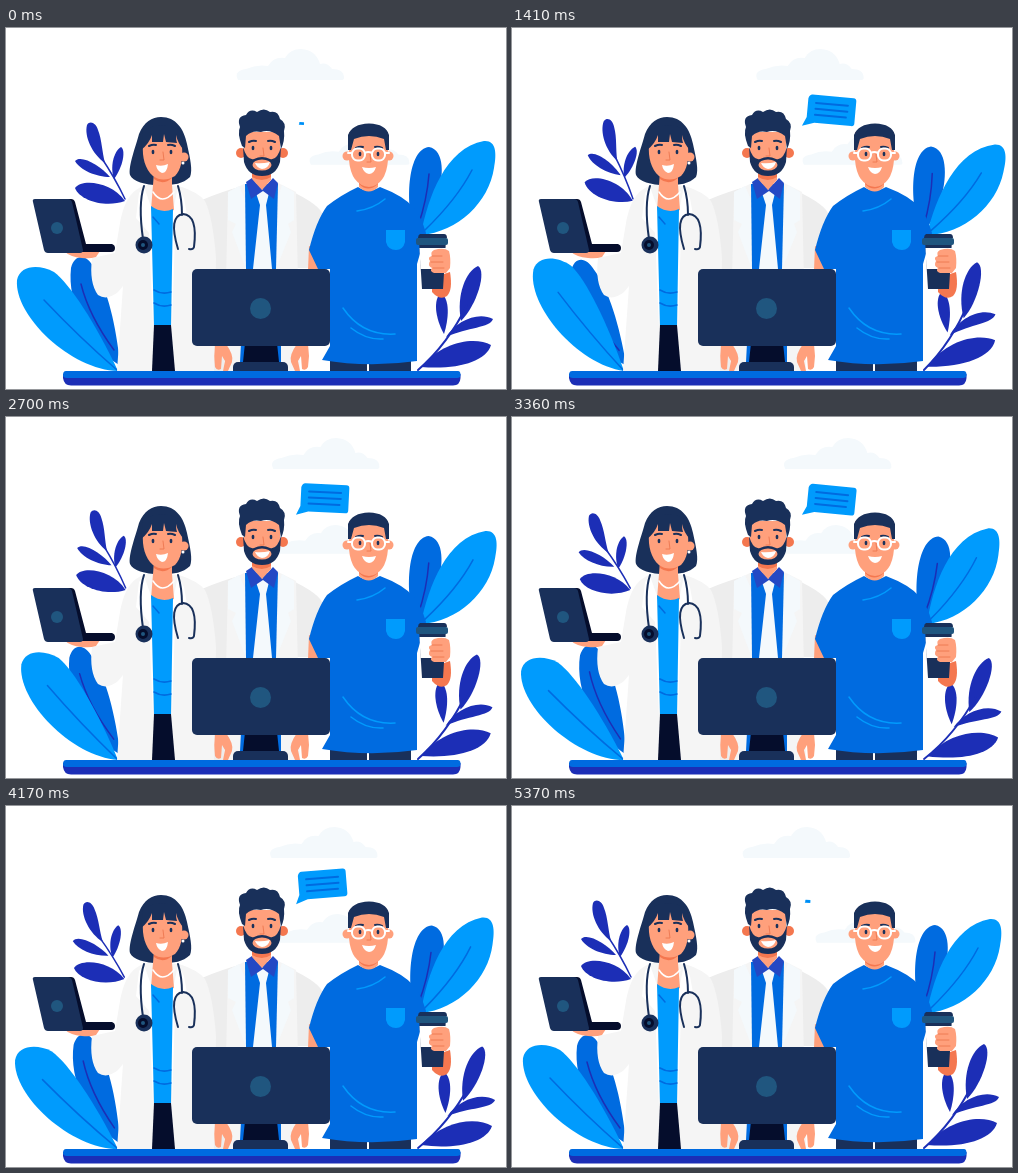
Write an HTML page that moves like this. It is 500 px wide and 361 px high and loops after 5400 ms.

```html
<!DOCTYPE html>
<html lang="en">
<head>
<meta charset="utf-8">
<title>Medical team</title>
<style>
html, body { margin: 0; width: 100%; height: 100%; overflow: hidden; background: #fff; }
svg { display: block; width: 100vw; height: 100vh; }
.sky { fill: #009bfd } .blue { fill: #006be0 } .royal { fill: #1c2eb6 } .collar { fill: #2448c4 }
.navy { fill: #19305a } .ink { fill: #050d2c } .teal { fill: #20567f }
.skin { fill: #ffa07c } .blush { fill: #f4774f } .white { fill: #fff }
.coat { fill: #f5f5f5 } .shade { fill: #ededed } .cloud { fill: #f4f9fc }
.line { fill: none; stroke-width: 1.5; stroke-linecap: round; stroke-linejoin: round }
.thick { stroke-width: 2 } .thin { stroke-width: .9 }
.s-sky { stroke: #009bfd } .s-blue { stroke: #006be0 } .s-royal { stroke: #1c2eb6 }
.s-navy { stroke: #19305a } .s-white { stroke: #fff } .s-blush { stroke: #ed7650 }
</style>
</head>
<body>
<svg viewBox="0 0 500 361" preserveAspectRatio="none">
  <defs>
    <path id="puff" d="M2 31Q-3 22 10 20Q21 15 32 17Q38 7 49 9Q54 0 65 0Q80 1 84 15Q91 13 96 20Q108 20 108 29Q108 31 105 31Z"/>
    <g id="face">
      <ellipse cx="-9" cy="0" rx="1.4" ry="2.3" class="navy"/>
      <ellipse cx="9" cy="0" rx="1.4" ry="2.3" class="navy"/>
      <path class="line thick s-navy" d="M-13-6Q-9-8-6-7M6-7Q9-8 13-6"/>
      <path class="line thin s-blush" d="M1 0L2 8H-2"/>
    </g>
  </defs>

  <g class="cloud">
    <use id="cloudA" href="#puff"/>
    <use id="cloudB" href="#puff"/>
  </g>

  <g id="bubble">
    <path class="sky" d="M5-31H46Q49-31 49-28V-6Q49-3 46-3H9L-3 1L1-8V-27Q2-31 5-31Z"/>
    <path class="line thick s-blue" d="M9-23H41M9-17H41M9-11H40"/>
  </g>

  <!-- Plants -->
  <g id="leftBack">
    <path class="blue" d="M113 337C82 317 61 275 65 240C69 225 81 226 88 240C102 262 110 298 114 335Z"/>
    <path class="line s-royal" d="M75 256Q83 288 108 322"/>
  </g>
  <g id="leftFront">
    <path class="sky" d="M112 343C65 342 8 288 11 252C14 237 33 236 48 244C64 256 90 296 112 343Z"/>
    <path class="line s-blue" d="M38 272Q74 310 111 342"/>
  </g>
  <g id="sprigLeft" class="royal">
    <path d="M99 135C86 126 78 108 81 97C84 92 90 95 92 102C96 112 96 124 99 135Z"/>
    <path d="M108 151C104 140 107 124 115 119C120 122 117 139 108 151Z"/>
    <path d="M104 149C90 149 74 142 69 133C75 126 95 138 104 149Z"/>
    <path d="M119 173C100 180 74 173 69 160C76 150 106 154 119 173Z"/>
    <path class="line s-royal" d="M119 171Q109 150 95 129"/>
  </g>
  <g id="rightBack">
    <path class="blue" d="M408 203C399 172 402 121 423 119C439 122 438 149 431 170C427 186 418 196 412 205Z"/>
    <path class="line s-royal" d="M423 146Q421 172 412 198"/>
  </g>
  <g id="rightFront">
    <path class="sky" d="M415 206C422 170 439 120 478 113C490 112 491 125 488 140C483 174 452 204 415 207Z"/>
    <path class="line s-blue" d="M466 142Q451 171 419 202"/>
  </g>
  <g id="sprigRight" class="royal">
    <path d="M455 293C450 267 460 243 472 238C481 243 471 277 455 293Z"/>
    <path d="M440 309C450 293 472 283 487 291C484 300 462 299 440 309Z"/>
    <path d="M415 339C438 312 470 309 485 317C480 334 450 342 415 339Z"/>
    <path d="M438 306C429 290 427 271 435 265C444 271 443 290 438 306Z"/>
    <path class="line thick s-royal" d="M412 342Q442 316 461 277"/>
  </g>

  <!-- Man in the middle -->
  <path class="shade" d="M240 157Q214 164 196 172L190 343H222L240 240H306L316 185Q311 174 272 157Z"/>
  <path class="coat" d="M238 156L222 164L218 343H294L290 164L272 155Z"/>
  <path class="cloud" d="M233 158L222 164V192L230 196L226 204L240 241L241 176ZM276 157L288 164V192L282 196L285 204L270 241L270 176Z"/>
  <path class="blue" d="M239 156H272L270 241H240Z"/>
  <path class="cloud" d="M250 165L257 161L263 165L260 177L266 241H247L254 177Z"/>
  <path class="collar" d="M240 154L246 150L256 162L267 150L272 155L268 171L257 163L245 171Z"/>
  <path class="skin" d="M246 140H265V152L256 162L246 151Z"/>
  <path class="blush" d="M246 143H265V149Q256 155 246 149Z"/>
  <circle class="blush" cx="235" cy="125" r="5"/><circle class="blush" cx="277" cy="125" r="5"/>
  <path class="skin" d="M238 104H274V128Q273 145 256 147Q239 145 238 128Z"/>
  <path class="navy" d="M236 118Q231 105 234 99Q230 88 240 87Q244 80 251 84Q258 79 264 84Q272 82 274 91Q281 95 278 103Q279 113 275 121L273 108Q264 101 255 104Q246 102 240 108L239 120Z"/>
  <path class="navy" d="M237 119Q241 133 248 131Q256 127 264 131Q271 133 275 119L274 134Q270 148 256 148Q242 148 238 134Z"/>
  <ellipse class="skin" cx="256" cy="137" rx="9.5" ry="5.5"/>
  <path class="white" d="M249 135Q256 136 264 134Q262 141 256 141Q251 140 249 135Z"/>
  <use href="#face" x="256" y="120"/>
  <path class="ink" d="M237 315H274V337H237Z"/>
  <path class="blue" d="M235 315H239L237 334H234ZM271 315H275V334H273Z"/>
  <path id="hand" class="skin" d="M209 316H220Q228 327 226 334L222 343H217L219 333L216 328L215 341Q211 343 209 339L208 328Z"/>
  <use href="#hand" transform="matrix(-1 0 0 1 511 0)"/>

  <!-- Woman -->
  <path class="navy" d="M155 89C170 89 178 101 181 116C184 130 187 142 184 149C177 156 167 157 158 157C142 158 127 154 124 147C122 138 130 118 133 106C138 94 146 89 155 89Z"/>
  <path class="coat" d="M140 157C124 162 118 175 114 195L109 225L86 230Q83 255 92 267Q101 273 112 264L117 258L111 343H208L210 230Q207 190 199 173Q192 164 173 158Z"/>
  <path class="white" d="M138 159L133 165L130 190L143 205L147 300L149 190ZM172 159L178 170L182 192L169 206L166 300L166 188Z"/>
  <path class="skin" d="M148 144H166V157L168 182Q157 187 145 182L147 157Z"/>
  <path class="blush" d="M148 147Q157 155 166 147V150Q157 158 148 151Z"/>
  <path class="sky" d="M145 178Q156 186 167 181L165 298H148Z"/>
  <path class="line s-blue" d="M148 262Q156 267 165 264M148 275Q156 280 165 277M147 189L153 196"/>
  <path class="ink" d="M148 297H165L169 343H146Z"/>
  <path class="line s-white" d="M147 164Q156 178 168 164"/>
  <circle class="skin" cx="178" cy="129" r="4.5"/>
  <path class="skin" d="M137 117Q139 111 145 106H170Q176 111 176 118C177 132 175 142 169 148Q157 155 147 148C139 141 136 129 137 117Z"/>
  <path class="navy" d="M135 122L137 103Q156 91 175 103L178 122Q172 116 170 107Q170 112 171 115L160 114L158 106L157 114L146 114L146 107Q143 116 135 122Z"/>
  <use href="#face" x="156" y="124"/>
  <path class="white" d="M150 137Q156 139 162 136Q161 145 156 145Q151 143 150 137Z"/>
  <circle class="white" cx="177" cy="135" r="1.5"/>
  <path class="coat" d="M169 221Q163 186 177 186Q191 187 188 221Z"/>
  <path class="line thick s-navy" d="M138 158Q132 176 137 211M172 158Q176 171 176 187M172 221Q162 188 177 186Q192 187 188 219Q187 222 183 221"/>
  <circle class="navy" cx="138" cy="217" r="8.5"/><circle class="ink" cx="137" cy="217" r="5"/><circle class="teal" cx="137" cy="217" r="2"/>
  <path class="skin" d="M58 223H94L90 229Q84 231 76 230Q64 229 58 223Z"/>
  <path class="ink" d="M33 171H65Q68 171 69 174L80 216H106Q109 217 109 220Q109 224 105 224H44Z"/>
  <path class="navy" d="M29 171H62Q65 171 66 174L77 222Q77 225 74 225H42Q39 225 38 222L27 174Q26 171 29 171Z"/>
  <circle class="teal" cx="51" cy="200" r="6"/>

  <!-- Man on the right -->
  <path class="skin" d="M303 218L315 222L317 242H302Z"/>
  <path class="navy" d="M324 330H405V343H324Z"/>
  <path class="white" d="M361 336H363V343H361Z"/>
  <path class="blush" d="M426 250L444 244Q447 262 441 268Q434 273 426 264Z"/>
  <path class="blue" d="M352 159Q362 166 374 159Q398 168 408 180Q415 188 420 205L411 236V333Q362 340 316 332L324 318V241H312L303 222Q310 193 321 178Q335 167 352 159Z"/>
  <path class="skin" d="M353 145H372V159Q363 168 353 159Z"/>
  <path class="blush" d="M353 153Q362 162 372 153V156Q362 165 353 156Z"/>
  <circle class="skin" cx="341" cy="128" r="4.5"/><circle class="skin" cx="383" cy="128" r="4.500"/>
  <path class="skin" d="M343 104H382V132Q380 157 363 159Q345 157 343 132Z"/>
  <path class="navy" d="M342 122V107Q346 96 363 95.500Q380 96 383 107V122H380L378 111Q363 105 348 111L345 122Z"/>
  <use href="#face" x="363" y="126"/>
  <g class="line thick s-white"><rect x="346" y="120.500" width="13" height="12" rx="5.500"/><rect x="366" y="120.500" width="13" height="12" rx="5.500"/><path d="M359 125Q362 123 366 125M346 125H342M379 125H383"/></g>
  <path class="white" d="M356 139Q363 141 370 139Q368 146 363 146Q358 145 356 139Z"/>
  <path class="sky" d="M380 202H399V214Q397 222 390 222Q382 222 380 214Z"/>
  <path class="line s-sky" d="M351 183Q367 181 379 171M337 280Q356 308 389 306M345 300Q360 312 377 311"/>
  <path class="navy" d="M413 212H440L437 261H416Z"/>
  <path class="white" d="M413.500 220H440L438 241H414.500Z"/>
  <path class="navy" d="M414 206H438Q441 206 441 210H412Q412 207 414 206Z"/>
  <rect class="teal" x="410" y="210" width="32" height="7" rx="2"/>
  <path class="skin" d="M428 222Q438 219 443 223Q445 230 444 240L440 245H428Q423 243 426 240Q421 238 424 233Q421 229 426 228Q424 224 428 222Z"/>
  <path class="line thin s-blush" d="M426 228H436M425 234H437M427 240H438"/>

  <!-- Desk and monitor -->
  <rect class="navy" x="227" y="334" width="55" height="14" rx="5"/>
  <rect class="navy" x="186" y="241" width="138" height="77" rx="5"/>
  <circle class="teal" cx="254.500" cy="280.500" r="10.500"/>
  <path class="royal" d="M57 346H454.500V350Q454 357.500 447 357.500H65Q58 357.500 57 350Z"/>
  <path class="blue" d="M60 343H452Q454.500 343 454.500 347Q454.500 350 451 350H61Q57 350 57 347Q57 343 60 343Z"/>
</svg>
<script>
const LOOP = 5400;
const move = (id, value) => document.getElementById(id).setAttribute("transform", value);

// Eased value at time t through [time, value] keys.
function track(t, keys) {
  const i = keys.findIndex(k => k[0] > t);
  const [t0, a] = keys[i - 1], [t1, b] = keys[i];
  return a + (b - a) * (1 - Math.cos(Math.PI * (t - t0) / (t1 - t0))) / 2;
}

// id, pivot x, pivot y, angle at one third, angle at two thirds
const plants = [
  ["leftBack", 113, 337, -4, 2],
  ["leftFront", 112, 343, 7, -1.6],
  ["sprigLeft", 121, 188, 7.5, -3],
  ["rightBack", 410, 205, -3, 2.5],
  ["rightFront", 412, 207, 3.4, -1.6],
  ["sprigRight", 412, 343, -4.2, 3]
];
const tilt = [[0, 5], [780, -5], [1500, 5.5], [2250, .5], [3250, 6], [4300, -5], [LOOP, 5]];
const size = [[0, .1], [620, 1], [4900, 1], [LOOP, .1]];
const drift = [[0, 0], [3650, 42], [LOOP, 0]];

function draw(now) {
  const t = now % LOOP;
  const x = track(t, drift);
  move("cloudA", `translate(${230 + x} 21)`);
  move("cloudB", `translate(${303 - x * .95} 108) scale(.93)`);
  move("bubble", `translate(293 97) rotate(${track(t, tilt)}) scale(${track(t, size)})`);
  for (const [id, px, py, a, b] of plants) {
    const angle = track(t, [[0, 0], [1800, a], [3600, b], [LOOP, 0]]);
    move(id, `rotate(${angle} ${px} ${py})`);
  }
}

const start = performance.now();
function tick() {
  draw(performance.now() - start);
  requestAnimationFrame(tick);
}
tick();
</script>
</body>
</html>
```
